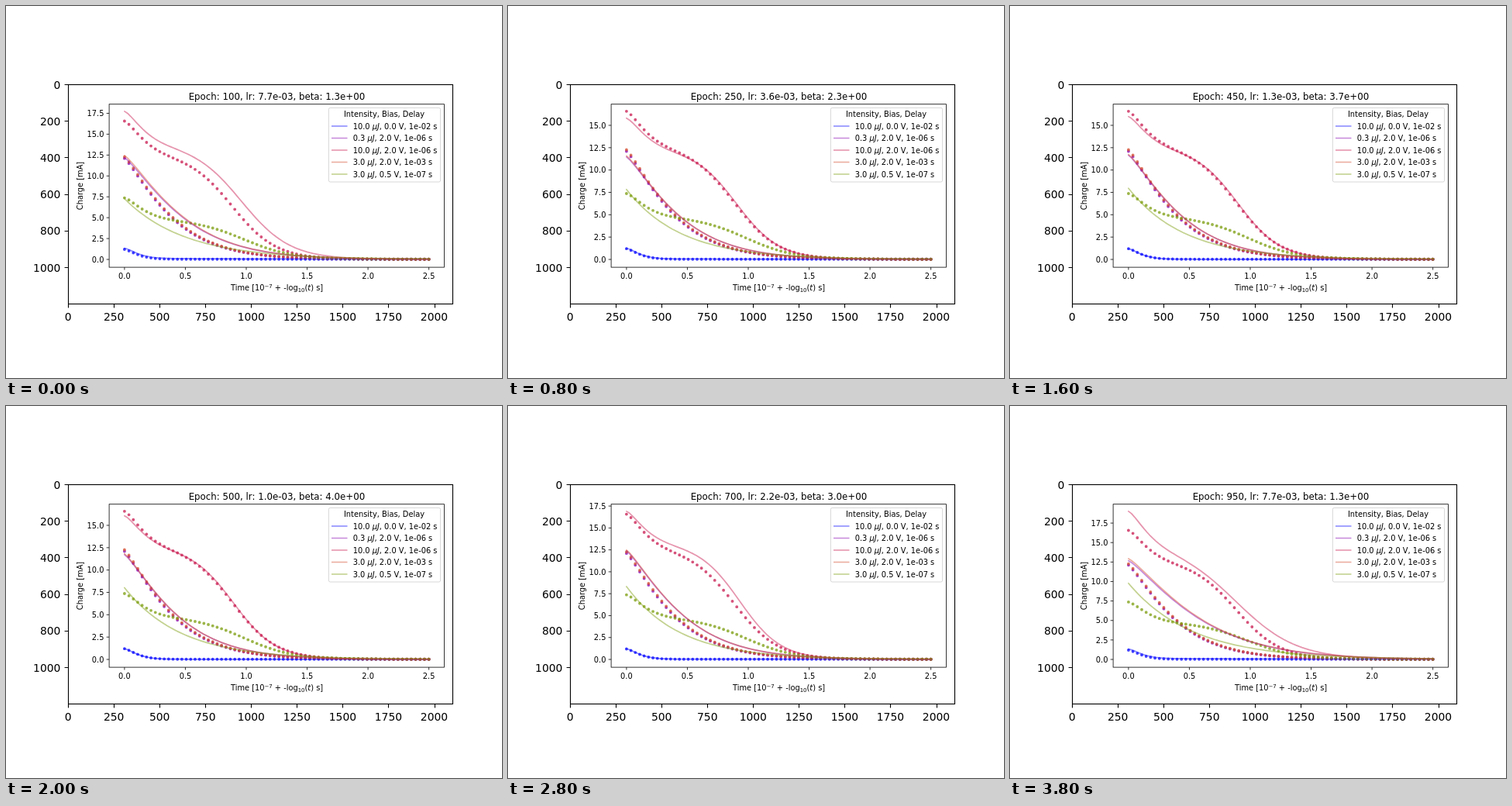
An HTML page that plays this animation: 640 by 480 pixels, repeating every 4000 ms.

```html
<!DOCTYPE html>
<html lang="en">
<head>
<meta charset="utf-8">
<title>Charge decay fit</title>
<style>
  html, body { margin: 0; width: 100%; height: 100%; overflow: hidden; background: #fff; }
  svg { display: block; width: 640px; height: 480px; font-family: "DejaVu Sans", sans-serif; }
  .outer { font-size: 13.89px; }
  .inner { font-size: 9.84px; }
  .title { font-size: 11.81px; }
  .mid { text-anchor: middle; }
  .end { text-anchor: end; }
  .axis { stroke: #000; fill: none; }
</style>
</head>
<body>
<svg id="stage" viewBox="0 0 640 480" xmlns="http://www.w3.org/2000/svg"></svg>
<script>
const NS = "http://www.w3.org/2000/svg";
const stage = document.getElementById("stage");

function add(tag, attrs, text = "", parent = stage) {
  const el = document.createElementNS(NS, tag);
  for (const key in attrs) el.setAttribute(key, attrs[key]);
  el.innerHTML = text;
  parent.appendChild(el);
  return el;
}

// Plot geometry
const LEFT = 133.1, RIGHT = 565.5, TOP = 126.7, BOTTOM = 337.1;
const ZERO_Y = 327, SPAN = 190.9, DOT_MAX = 16.55;
const STEP_MS = 200, DOTS = 70, IMAGE_SCALE = .2362;
const px = t => 152.9 + t * 157.1;

const series = [
  { color: "#0000ff", label: ["10.0", "0.0", "02"] },
  { color: "#8500b1", label: ["0.3", "2.0", "06"] },
  { color: "#c8164d", label: ["10.0", "2.0", "06"] },
  { color: "#d4482a", label: ["3.0", "2.0", "03"] },
  { color: "#7a9b0a", label: ["3.0", "0.5", "07"] }
];

// Charge in mA over time: a stretched exponential, and one that settles on a sigmoid shelf
const decay = (start, tau, power) => t => start * Math.exp(-((t / tau) ** power));
function shelf(start, share, center, width) {
  const step = t => start * share / (1 + Math.exp((t - center) / width));
  const rest = decay(start - step(0), .19, 1.4);
  return t => step(t) + rest(t);
}

const measured = [
  decay(1.18, .132, 1.4),
  decay(12.08, .43, 1.2),
  shelf(16.55, .767, .885, .18),
  decay(12.25, .436, 1.2),
  shelf(7.35, .65, .98, .2)
];

// epoch, then high curve: start, center, width; middle: start, tau; low: start, tau
const keys = [
  [50, 15.9, .93, .2, 11.2, .53, 6.8, .5],
  [100, 17.72, .96, .2, 12.3, .528, 7.25, .5],
  [250, 15.78, .905, .175, 11.5, .49, 7.8, .45],
  [500, 16.05, .895, .175, 11.75, .485, 8, .463],
  [700, 16.88, .93, .17, 12.4, .505, 8.3, .44],
  [800, 17.05, .94, .185, 11.6, .54, 7.6, .455],
  [950, 18.99, .88, .25, 12.78, .64, 9.75, .525],
  [1000, 17.3, .95, .2, 12.1, .53, 7.2, .5]
];

function fitAt(epoch, warmth) {
  const i = Math.max(1, keys.findIndex(key => key[0] >= epoch));
  const a = keys[i - 1], b = keys[i];
  const k = ((epoch - a[0]) / (b[0] - a[0])) ** 1.7;
  const [, start, center, width, mid, midTau, low, lowTau] = a.map((v, n) => v + (b[n] - v) * k);

  const gap = .004 + .01 * warmth ** 4;
  const tail = .16 * warmth ** 2;
  const pulse = decay(1.18 + tail, .132, 1.4);
  return [
    t => pulse(t) + tail * (1 - Math.exp(-t / .1)) * Math.exp(-t),
    decay(mid * (1 - gap), midTau, 1.22),
    shelf(start, .785, center, width),
    decay(mid * (1 + gap), midTau, 1.22),
    decay(low, lowTau, 1)
  ];
}

function drawOuter() {
  add("rect", { x: 80.5, y: 101.5, width: 496, height: 283, class: "axis", "stroke-width": 1.11 });
  let d = "";
  for (let v = 0; v <= 2000; v += 250) {
    const x = 80.1 + v * IMAGE_SCALE;
    d += `M${Math.round(x) + .5} 384.5v4.9`;
    add("text", { x, y: 406, class: "outer mid" }, v);
  }
  for (let v = 0; v <= 1000; v += 200) {
    const y = 100.81 + v * IMAGE_SCALE;
    d += `M80.5 ${Math.round(y) + .5}h-4.9`;
    add("text", { x: 70.4, y: Math.round(y + 5.7), class: "outer end" }, v);
  }
  add("path", { d, class: "axis", "stroke-width": 1.11 });
}

function drawInner() {
  add("rect", { x: LEFT, y: TOP, width: RIGHT - LEFT, height: BOTTOM - TOP, class: "axis", "stroke-width": .79 });
  let d = "";
  for (let t = 0; t <= 2.5; t += .5) {
    d += `M${px(t)} ${BOTTOM}v3.44`;
    add("text", { x: px(t), y: 351.9, class: "inner mid" }, t.toFixed(1));
  }
  add("path", { d, class: "axis", "stroke-width": .79 });
  const small = (dy, s) => `<tspan dy="${dy}" font-size="6.89">${s}</tspan>`;
  add("text", { x: 349.6, y: 367.2, class: "inner mid" },
    `Time [10${small(-3.6, "−7")}<tspan dy="3.6"> + -log</tspan>${small(2.2, "10")}` +
    `<tspan dy="-2.2">(</tspan><tspan font-style="italic">t</tspan>) s]`);
  add("text", { transform: "translate(99.2 232) rotate(-90)", class: "inner mid" }, "Charge [mA]");
}

function drawLegend() {
  add("rect", { x: 416.4, y: 131.4, width: 144.2, height: 95.6, rx: 2, fill: "#fff", "fill-opacity": .8,
    stroke: "#ccc", "stroke-opacity": .8, "stroke-width": .98 });
  add("text", { x: 488, y: 143.4, class: "inner mid" }, "Intensity, Bias, Delay");
  series.forEach((s, i) => {
    const y = 155 + i * 15.5, [power, bias, delay] = s.label;
    add("path", { d: `M420 ${y}h20.5`, stroke: s.color, "stroke-opacity": .45, "stroke-width": 1.6 });
    add("text", { x: 447.7, y: y + 3.7, class: "inner" },
      `${power} <tspan font-style="italic">μJ</tspan>, ${bias} V, 1e-${delay} s`);
  });
}

drawOuter();
drawInner();
const title = add("text", { x: 349.4, y: 120.6, class: "title mid" });
const tickLayer = add("g", {});
const strokes = attrs => series.map(s =>
  add("path", { fill: "none", stroke: s.color, "stroke-linecap": "round", "stroke-linejoin": "round", ...attrs }));
const dotPaths = strokes({ "stroke-opacity": .74, "stroke-width": 3.9 });
const linePaths = strokes({ "stroke-opacity": .45, "stroke-width": 1.75 });
drawLegend();

// Plot order is the epochs sorted as text: 100, 1000, 150, ...
const epochs = Array.from({ length: 20 }, (_, i) => 50 * (i + 1)).sort();
const expo = v => v.toExponential(1).replace(/(\d)$/, "0$1");

// Evenly spaced points of a curve as "x y" strings
const sample = (f, count, py) => Array.from({ length: count }, (_, n) => {
  const t = 2.5 * n / (count - 1);
  return px(t).toFixed(2) + " " + py(f(t) + .02).toFixed(2);
});

function draw(epoch) {
  const index = epoch / 50 - 1;
  const progress = Math.min(index, 19 - index) / 9;
  title.textContent = `Epoch: ${epoch}, lr: ${expo(10 ** (-2 - progress))}, beta: ${expo(1 + 3 * progress)}`;

  const fit = fitAt(epoch, 1 - progress);
  const max = Math.max(DOT_MAX, fit[2](0));
  const py = v => ZERO_Y - v * SPAN / max;

  tickLayer.replaceChildren();
  for (let v = 0; py(v) > TOP; v += 2.5) {
    add("path", { d: `M${LEFT} ${py(v)}h-3.44`, class: "axis", "stroke-width": .79 }, "", tickLayer);
    add("text", { x: 126.5, y: py(v) + 3.7, class: "inner end" }, v.toFixed(1), tickLayer);
  }

  series.forEach((_, i) => {
    dotPaths[i].setAttribute("d", sample(measured[i], DOTS, py).map(p => `M${p}h0`).join(""));
    linePaths[i].setAttribute("d", "M" + sample(fit[i], 101, py).join("L"));
  });
}

let shown = -1;
const start = performance.now();
function tick() {
  const step = Math.floor((performance.now() - start) / STEP_MS) % epochs.length;
  if (step !== shown) draw(epochs[shown = step]);
  requestAnimationFrame(tick);
}
tick();
</script>
</body>
</html>
```
